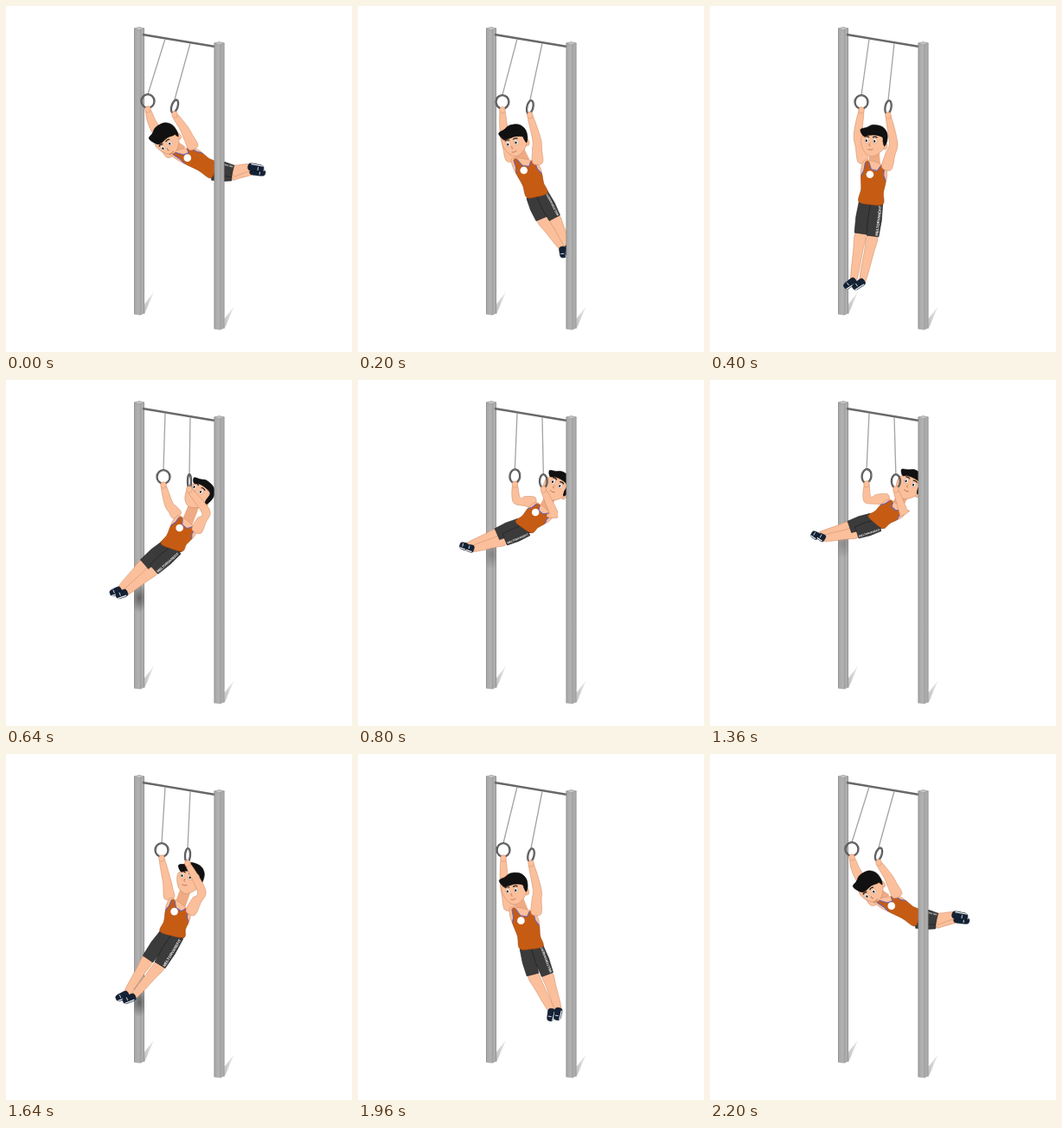
Write an HTML page that moves like this. It is 400 px wide and 400 px high and loops after 2240 ms.

```html
<!DOCTYPE html>
<html lang="en">
<head>
<meta charset="utf-8">
<title>Ring swing</title>
<style>
  html, body { margin: 0; width: 100%; height: 100%; overflow: hidden; background: #fff; }
  svg { display: block; width: 100vw; height: 100vh; }
  text { font: 700 5px "Liberation Sans", Arial, sans-serif; fill: #fff; }
</style>
</head>
<body>
<svg viewBox="0 0 400 400">
  <defs>
    <linearGradient id="steel">
      <stop offset="0" stop-color="#868686"/>
      <stop offset=".12" stop-color="#a9a9a9"/>
      <stop offset=".5" stop-color="#b3b3b3"/>
      <stop offset=".58" stop-color="#a2a2a2"/>
      <stop offset=".88" stop-color="#b0b0b0"/>
      <stop offset="1" stop-color="#828282"/>
    </linearGradient>
    <linearGradient id="ground" x1="0" y1="1" x2="1" y2="0">
      <stop offset="0" stop-color="#bdbdbd"/>
      <stop offset="1" stop-color="#ececec"/>
    </linearGradient>
    <radialGradient id="smudge">
      <stop offset="0" stop-color="#222" stop-opacity=".9"/>
      <stop offset="1" stop-color="#222" stop-opacity="0"/>
    </radialGradient>
    <clipPath id="postArea"><path d="M148 26H160V357H148Z"/></clipPath>
    <g id="post">
      <path d="M12 320L23 306L12 332Z" fill="url(#ground)"/>
      <path d="M0 1.500L6 0L12 1.500V331L7 333L0 332Z" fill="url(#steel)"/>
      <path d="M0 1.500L6 0L12 1.500L6 3.500Z" fill="#c6c6c6" stroke="#888" stroke-width=".5"/>
    </g>
  </defs>
  <use href="#post" x="148" y="24.500"/>
  <g clip-path="url(#postArea)"><ellipse id="shade" cx="154" rx="10" ry="17" fill="url(#smudge)"/></g>
  <path d="M158 33L242 47" stroke="#68686a" stroke-width="2.400"/>
  <g id="athlete"></g>
  <use href="#post" x="240.500" y="41.500"/>
</svg>
<script>
const STEP = 40, STEPS = 56;
const KEYS = [0, 240, 400, 560, 640, 1000, 1080];
const SKIN = '#fbc09b', SKIN_EDGE = '#d08f6c';
const athlete = document.getElementById('athlete');
const shade = document.getElementById('shade');

// Smooth curve through the key poses, at rest at both ends of the swing.
function track(v) {
  const last = KEYS.length - 1;
  const slope = i => i === 0 || i === last ? 0 : (v[i + 1] - v[i - 1]) / (KEYS[i + 1] - KEYS[i - 1]);
  return t => {
    let i = 0;
    while (i < last - 1 && t >= KEYS[i + 1]) i++;
    const span = KEYS[i + 1] - KEYS[i], s = (t - KEYS[i]) / span, r = 1 - s;
    return r * r * ((1 + 2 * s) * v[i] + s * span * slope(i))
         + s * s * ((3 - 2 * s) * v[i + 1] - r * span * slope(i + 1));
  };
}
function point(xs, ys) {
  const x = track(xs), y = track(ys);
  return t => [x(t), y(t)];
}

const ringL = point([164, 168, 175, 180, 182, 180, 180], [110, 111, 111, 111, 112, 110, 110]);
const ringR = point([195, 200, 206, 210, 212, 217, 218], [116, 117, 117, 117, 117, 117, 117]);
const widthL = track([7.5, 7.5, 7.5, 7.5, 7.5, 3.8, 3.8]);
const widthR = track([3.5, 3.5, 3.5, 3, 2, 7.5, 7.5]);
const tiltL = track([0, 0, 0, 0, 0, 14, 14]);
const tiltR = track([18, 12, 10, 4, 0, 0, 0]);
const elbowL = point([169, 169, 171, 186, 188, 177, 177], [135, 148, 148, 147, 143, 134, 133]);
const elbowR = point([206, 207, 212, 226, 231, 217, 219], [142, 156, 158, 158, 152, 152, 151]);
const shoulderL = point([190, 175, 177, 189, 198, 211, 213], [172, 179, 180, 167, 157, 124, 122]);
const shoulderR = point([217, 206, 204, 213, 220, 229, 232], [164, 185, 188, 184, 175, 140, 137]);
const waistL = point([236, 187, 172, 178, 179, 186, 187], [199, 225, 226, 205, 189, 134, 131]);
const waistR = point([243, 214, 200, 206, 204, 198, 200], [181, 222, 229, 212, 198, 153, 151]);
const kneeL = point([261, 202, 174, 164, 160, 163, 163], [195, 255, 263, 237, 213, 139, 135]);
const kneeR = point([262, 219, 188, 178, 171, 170, 170], [191, 255, 266, 244, 219, 146, 142]);
const ankleL = point([285, 224, 166, 139, 131, 119, 117], [191, 297, 318, 278, 243, 137, 134]);
const ankleR = point([283, 232, 176, 147, 138, 127, 125], [186, 296, 319, 281, 246, 139, 136]);
const toes = point([14, -2, -10, -11, -10, -3, -3], [2, 11, 7, 5, 4, -9, -9]);
const head = point([186, 181, 189, 212, 222, 235, 238], [155, 157, 157, 145, 133, 115, 112]);
const turn = track([-35, -8, 4, 14, 38, 15, 15]);
const pitch = track([6, 1.5, 0, -1.5, -4, -1, -1]);
const yaw = track([-1, 0, 0, -1, -1, 6, 6]);
const shadeLevel = track([0, 0, 0, .6, .6, 0, 0]);

const add = (a, b, k = 1) => [a[0] + b[0] * k, a[1] + b[1] * k];
const mix = (a, b, k) => [a[0] + (b[0] - a[0]) * k, a[1] + (b[1] - a[1]) * k];
const str = p => p[0].toFixed(2) + ' ' + p[1].toFixed(2);
const angle = (a, b) => Math.atan2(b[1] - a[1], b[0] - a[0]) * 180 / Math.PI;
const poly = pts => 'M' + pts.map(str).join('L') + 'Z';

function smooth(pts) {
  const n = pts.length, at = i => pts[(i + n) % n];
  let d = 'M' + str(pts[0]);
  for (let i = 0; i < n; i++) {
    const a = at(i - 1), b = at(i), c = at(i + 1), e = at(i + 2);
    const h1 = add(b, [c[0] - a[0], c[1] - a[1]], 1 / 6);
    const h2 = add(c, [e[0] - b[0], e[1] - b[1]], -1 / 6);
    d += 'C' + [h1, h2, c].map(str).join(' ');
  }
  return d + 'Z';
}

// Outline of a tapering limb along a centre line.
function limb(pts, widths) {
  const near = [], far = [];
  pts.forEach((p, i) => {
    const a = pts[Math.max(i - 1, 0)], b = pts[Math.min(i + 1, pts.length - 1)];
    const dx = b[0] - a[0], dy = b[1] - a[1], half = widths[i] / 2 / (Math.hypot(dx, dy) || 1);
    near.push([p[0] - dy * half, p[1] + dx * half]);
    far.unshift([p[0] + dy * half, p[1] - dx * half]);
  });
  return near.concat(far);
}
const path = (d, fill, edge = 'none', w = .6) =>
  `<path d="${d}" fill="${fill}" stroke="${edge}" stroke-width="${w}" stroke-linejoin="round"/>`;
const oval = (x, y, rx, ry, rest) => `<ellipse cx="${x}" cy="${y}" rx="${rx}" ry="${ry}" ${rest}/>`;

const rope = (top, ring) =>
  `<path d="M${str(top)}L${str(add(ring, [0, -8]))}" stroke="#a3a3a3" stroke-width="1.3"/>`;
const ringShape = (c, w, tilt) =>
  `<g transform="translate(${str(c)}) rotate(${tilt})" fill="none">`
  + oval(0, 0, w, 7.8, 'stroke="#4b4b4d" stroke-width="2.3"')
  + oval(0, 0, w, 7.8, 'stroke="#8b8b8d" stroke-width=".6"') + '</g>';

function arm(shoulder, elbow, ring) {
  const hand = add(ring, [0, 10]);
  return path(smooth(limb([shoulder, mix(shoulder, elbow, .55), elbow, hand], [11, 11, 9.5, 5.5])), SKIN, SKIN_EDGE)
    + oval(hand[0], hand[1] - .5, 3.3, 3.8, `fill="${SKIN}" stroke="${SKIN_EDGE}" stroke-width=".5"`);
}

function leg(knee, ankle, toe) {
  const tip = add(ankle, toe), len = Math.hypot(...toe);
  const side = [toe[1] / len, -toe[0] / len];
  const sole = [add(ankle, side, 3.4), add(tip, side, 2.8)];
  const lace = mix(ankle, tip, .6);
  return path(smooth(limb([knee, mix(knee, ankle, .35), ankle], [11.5, 11, 6.5])), SKIN, SKIN_EDGE)
    + path(smooth(limb([add(ankle, toe, -.15), mix(ankle, tip, .5), tip], [7, 8, 5.5])), '#142236', '#0b1422')
    + path('M' + sole.map(str).join('L'), 'none', '#f4f6f8', 1.2)
    + path('M' + str(add(lace, side, -3)) + 'L' + str(add(lace, side, 1)), 'none', '#cfd8e2', 1);
}

function headShape(t) {
  const q = pitch(t), x = yaw(t);
  const eye = (ex, ey) => oval(ex, ey, 2.4, 2.9, 'fill="#fff" stroke="#a97455" stroke-width=".4"')
    + oval(ex - .3, ey + .3, 1.1, 1.4, 'fill="#20150f"')
    + path(`M${ex - 2.8} ${ey - 4}q2.500-1.800 5.500 0`, 'none', '#1a1a1a', 1.2);
  const face = [[-13, -6], [-14, 3], [-9, 13], [-1, 17], [7, 13], [13, 5], [14, -5], [0, -13]];
  const hair = [[-16, -13], [-9, -16], [-2, -19.5], [9, -18], [15, -11], [15.5, -2], [13, 4], [11, -1],
    [10, -6 + q], [2, -8 + q], [-7, -7 + q], [-12, -6 + q / 2]];
  return `<g transform="translate(${str(head(t))}) rotate(${turn(t)})">`
    + oval(13.5, 4, 2.8, 4, `fill="${SKIN}" stroke="${SKIN_EDGE}" stroke-width=".5"`)
    + path(smooth(face), SKIN, SKIN_EDGE)
    + eye(x - 8, q - 1) + eye(x + 1.5, q - 1)
    + path(`M${x - 4} ${q + 2}q-2 3 .8 3.200M${x - 6} ${q + 9}q3 1.500 6-.5`, 'none', '#b56f4e', .8)
    + path(smooth(hair), '#111', '#000') + '</g>';
}

function torso(t, sl, sr, wl, wr) {
  const at = ([u, v]) => mix(mix(sl, sr, u), mix(wl, wr, u), v);
  const edge = pts => path('M' + pts.map(p => str(at(p))).join('L'), 'none', '#6f63b5', 1.1);
  const chest = [[0, 0], [.3, -.08], [.7, -.08], [1, 0], [1, .4], [.5, .5], [0, .4]].map(at);
  const top = [[.1, 0], [.24, -.04], [.36, .13], [.62, .13], [.76, -.04], [.9, 0], [.9, .2], [1.02, .36],
    [.97, .68], [1, 1], [.5, 1.05], [0, 1], [.04, .68], [-.02, .36], [.08, .2]].map(at);
  let out = path(smooth(chest), SKIN, SKIN_EDGE) + path(smooth(top), '#c65c13', '#97430c')
    + edge([[.1, 0], [.07, .2], [-.01, .36]]) + edge([[.9, 0], [.91, .2], [1.01, .36]])
    + edge([[.24, -.03], [.37, .13], [.62, .13], [.76, -.03]]);
  if (t < 840) {
    const badge = at([.34, .27]);
    out += oval(badge[0], badge[1], 4.3, 4.3, 'fill="#fff"');
  }
  return out;
}

function shorts(wl, wr, kl, kr) {
  const hipL = mix(wl, wr, .26), hipR = mix(wl, wr, .74);
  const cloth = (hip, knee) => path(poly(limb([hip, mix(hip, knee, .5), knee], [14, 16, 14])), '#3b3b3c', '#1c1c1d');
  const size = Math.hypot(hipR[0] - kr[0], hipR[1] - kr[1]) / 9;
  return cloth(hipL, kl)
    + path(poly([wl, wr, mix(hipR, kr, .45), mix(hipL, kl, .45)]), '#3b3b3c')
    + cloth(hipR, kr)
    + `<text transform="translate(${str(kr)}) rotate(${angle(kr, hipR)})" x="1" y="6" style="font-size:${size}px">MELTORVANEFIT</text>`;
}

function draw(t) {
  const sl = shoulderL(t), sr = shoulderR(t), wl = waistL(t), wr = waistR(t);
  const kl = kneeL(t), kr = kneeR(t), rl = ringL(t), rr = ringR(t), toe = toes(t), foot = ankleL(t);
  const neck = limb([mix(sl, sr, .5), head(t)], [13, 12]);
  shade.setAttribute('cy', foot[1] + 9);
  shade.setAttribute('opacity', Math.max(0, shadeLevel(t)));
  athlete.innerHTML = rope([184, 38], rl) + rope([213, 43], rr)
    + ringShape(rl, widthL(t), tiltL(t)) + arm(sl, elbowL(t), rl)
    + path(poly(neck), '#eeab84')
    + leg(kl, foot, toe) + leg(kr, ankleR(t), toe)
    + shorts(wl, wr, kl, kr) + torso(t, sl, sr, wl, wr) + headShape(t)
    + ringShape(rr, widthR(t), tiltR(t)) + arm(sr, elbowR(t), rr);
}

let shown = -1;
function tick() {
  const step = Math.floor(performance.now() / STEP) % STEPS;
  if (step !== shown) {
    shown = step;
    draw(Math.min(step, STEPS - 1 - step) * STEP);
  }
  requestAnimationFrame(tick);
}
tick();
</script>
</body>
</html>
```
